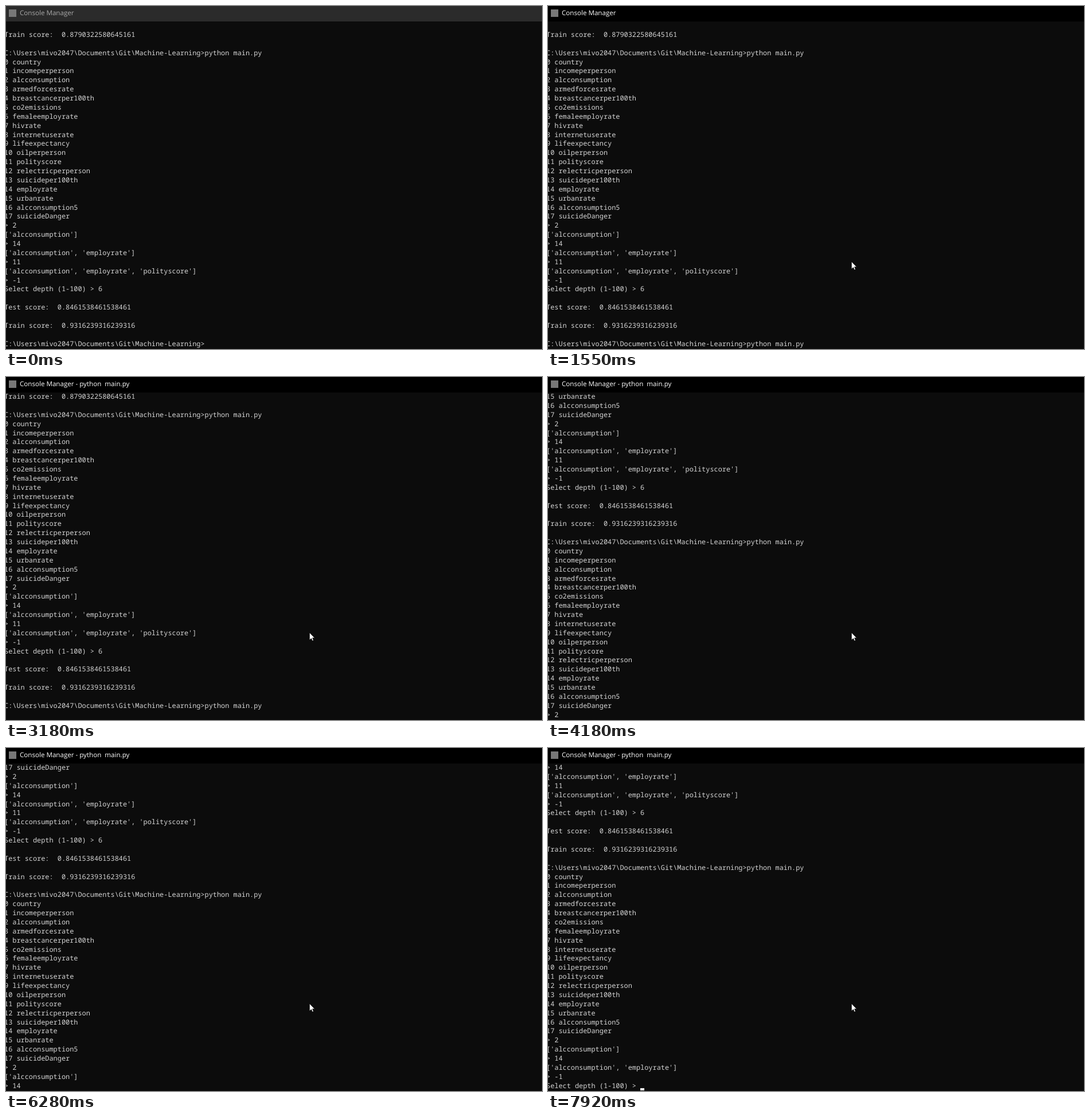
These frames come from a looping animation (935 by 599 pixels, 8000 ms). An HTML page:

```html
<!DOCTYPE html>
<html lang="en">
<head>
<meta charset="utf-8">
<title>Console</title>
<style>
  html, body { margin: 0; width: 100%; height: 100%; overflow: hidden; background: #0c0c0c; }
  body { position: relative; text-rendering: geometricPrecision; }
  body > * { position: absolute; }
  #log {
    margin: 0; left: -3px; top: 27px; color: #d4d4d4;
    font: 500 11.9px/15.88px "Noto Sans Mono", "DejaVu Sans Mono", monospace;
    font-variant-ligatures: none;
  }
  #caret { top: 594px; width: 7px; height: 4px; background: #f2f2f2; }
  #bar {
    left: 0; top: 0; width: 100%; height: 27px; background: #2b2b2b; color: #aaa;
    font: 11.6px/26px "Open Sans", "Noto Sans", sans-serif; white-space: pre;
  }
  #bar.active { background: #000; color: #fff; }
  #bar span { position: absolute; left: 24px; }
  #icon { position: absolute; left: 5px; top: 6px; width: 13px; height: 13px; background: #777; }
  #mouse { left: 529px; top: 446px; overflow: visible; }
</style>
</head>
<body>
<pre id="log"></pre>
<div id="caret"></div>
<div id="bar"><i id="icon"></i><span id="caption"></span></div>
<svg id="mouse" width="11" height="17">
  <path d="M.5 .5V13.3L3.5 10.5L5.4 14.8L7.4 13.9L5.6 9.7H9.4Z" fill="#fff" stroke="#000" stroke-width=".6"/>
</svg>
<script>
const LOOP = 8000, ROWS = 36, CHAR = 7.14;
const $ = id => document.getElementById(id);
const log = $('log'), caret = $('caret'), bar = $('bar'), caption = $('caption'), mouse = $('mouse');

const prompt = 'C:\\Users\\mivo2047\\Documents\\Git\\Machine-Learning>';
const command = 'python main.py';
const columns = ('country incomeperperson alcconsumption armedforcesrate breastcancerper100th ' +
  'co2emissions femaleemployrate hivrate internetuserate lifeexpectancy oilperperson polityscore ' +
  'relectricperperson suicideper100th employrate urbanrate alcconsumption5 suicideDanger').split(' ')
  .map((name, i) => `${i} ${name}\n`).join('');
const picked = (...names) => `['${names.join("', '")}']\n`;
const one = picked('alcconsumption');
const two = picked('alcconsumption', 'employrate');
const three = picked('alcconsumption', 'employrate', 'polityscore');
const depth = 'Select depth (1-100) > ';

const start = '\nTrain score:  0.8790322580645161\n\n' + prompt + command + '\n' + columns +
  '> 2\n' + one + '> 14\n' + two + '> 11\n' + three + '> -1\n' + depth + '6\n\n' +
  'Test score:  0.8461538461538461\n\nTrain score:  0.9316239316239316\n\n' + prompt;

// [time, appended output, caret visible]
const events = [
  [0, start, 0],
  [1080, command, 0], [1160, '', 1], [1550, '', 0],
  [2000, '\n', 0], [2630, '', 1], [3180, '', 0],
  [3410, columns + '> ', 0], [4110, '2', 1], [4180, '', 0],
  [4650, '\n' + one + '> ', 1], [5260, '', 0],
  [5810, '1', 1], [5890, '', 0], [6190, '4', 1], [6280, '', 0],
  [6510, '\n' + two + '> ', 1],
  [7220, '-', 1], [7300, '1', 1], [7380, '', 0],
  [7920, '\n' + depth, 1]
];

function draw(t) {
  const past = events.filter(e => e[0] <= t);
  const lines = past.map(e => e[1]).join('').split('\n').slice(-ROWS);
  const text = lines.join('\n');
  if (log.textContent !== text) log.textContent = text;

  caret.hidden = !past[past.length - 1][2];
  caret.style.left = Math.round(lines[ROWS - 1].length * CHAR - 3) + 'px';

  bar.className = t >= 540 ? 'active' : '';
  caption.textContent = 'Console Manager' + (t >= 2080 ? ' - python  main.py' : '');

  // The pointer slows down in four visible steps.
  const step = Math.min(3, Math.floor((t - 70) / 76));
  const rest = (1 - step / 3) ** 2;
  mouse.style.display = t < 70 ? 'none' : '';
  mouse.style.transform = `translate(${Math.round(176 * rest)}px, ${Math.round(117 * rest)}px)`;
}

const origin = performance.now();
function tick() {
  draw((performance.now() - origin) % LOOP);
  requestAnimationFrame(tick);
}
tick();
</script>
</body>
</html>
```
